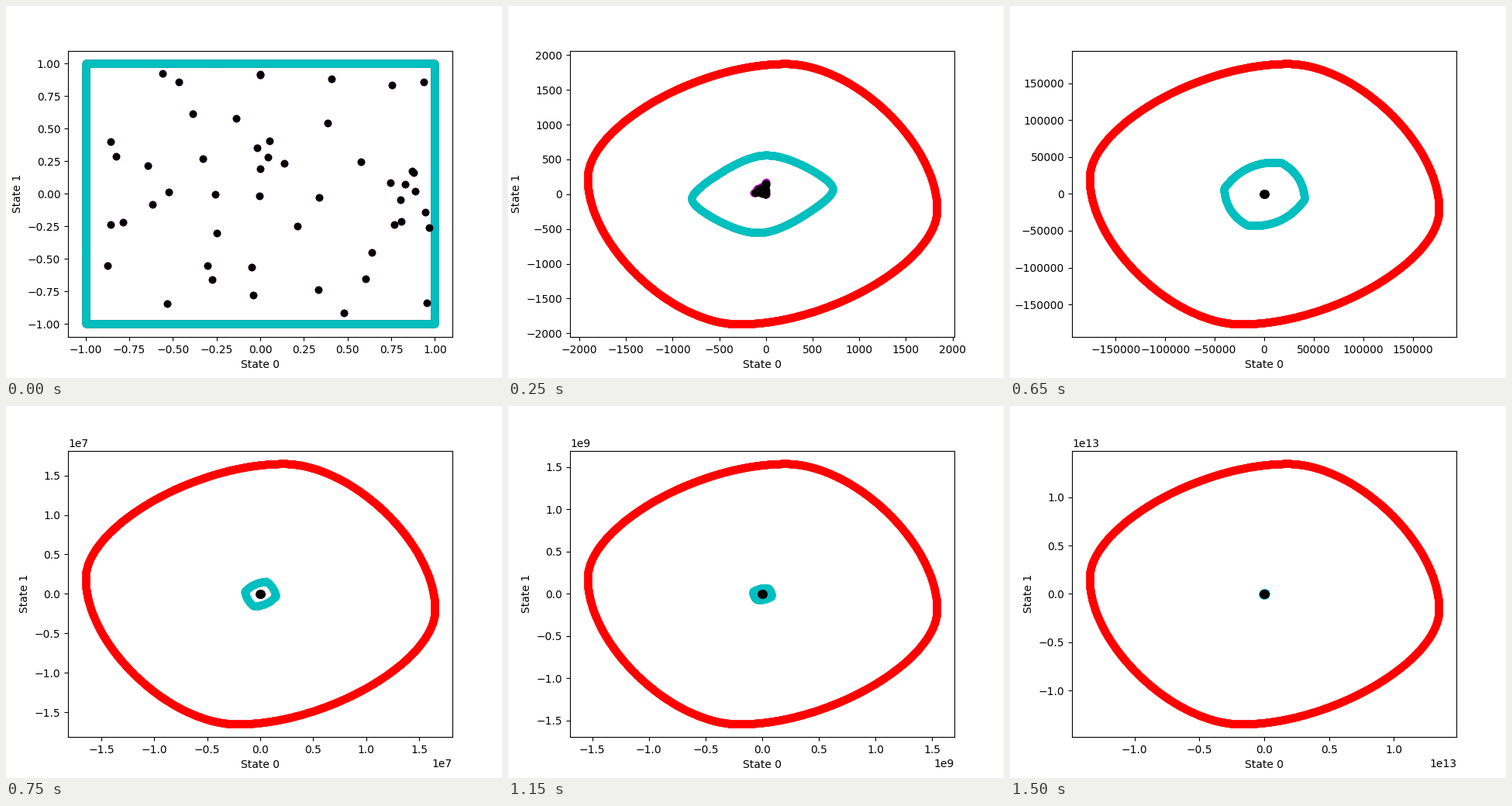
Animation of 640 by 480 pixels, one loop 1.75 s. Source, as a matplotlib script:

```python
import numpy as np
import matplotlib.pyplot as plt
from matplotlib.animation import FuncAnimation
from matplotlib.transforms import IdentityTransform

W, H = 640, 480
CENTER = np.array([328, H - 242.4])
HALF = np.array([225.45, 168])   # half extent of the outermost set
LIMIT, GROWTH = 1.942e5, 93.45   # axis range at step 2 and its growth per step
KAPPA = 0.45                     # fullness of the outer curve


def curve(*ctrl):
    """Quadratic or cubic Bezier through its control points."""
    t = np.linspace(0, 1, 60, endpoint=False)[:, None]
    pts = [np.array(p, float) for p in ctrl]
    while len(pts) > 1:
        pts = [a + (b - a) * t for a, b in zip(pts, pts[1:])]
    return pts[0]


def closed(half, step=0.5):
    """Point-reflect half an outline and dot it evenly around the centre."""
    p = np.vstack([half, -half, half[:1]])
    s = np.r_[0, np.cumsum(np.hypot(*np.diff(p, axis=0).T))]
    t = np.linspace(0, s[-1], int(s[-1] / step) + 4, endpoint=False)
    return CENTER + np.column_stack([np.interp(t, s, xy) for xy in p.T])


def rounded(half):
    """Quadratic spline that touches the middle of each polygon edge."""
    p = np.vstack([half, -np.array(half)])
    n = len(half)
    mid = (p + np.roll(p, 1, axis=0)) / 2
    return closed(np.vstack([curve(mid[k], p[k], mid[k + 1])
                             for k in range(n)]))


def bowed(a, b, bow):
    """Parallelogram a, b, -a, -b whose sides bend outwards."""
    a, b = np.array(a, float), np.array(b, float)
    sides = []
    for p, q in ((a, b), (b, -a)):
        dx, dy = q - p
        sides.append(curve(p, (p + q) / 2 + 2 * bow * np.array([-dy, dx]), q))
    return closed(np.vstack(sides))


hx, hy = HALF
left, top, right = np.array([(-hx, 20), (30, hy), (hx, -20)])
up, across = np.array([0, 1]), np.array([1, 0])
square = closed(np.array([(-hx, -hy), (-hx, hy)]))
bound = closed(np.vstack([
    curve(left, left + KAPPA * (top - left) * up,
          top + KAPPA * (left - top) * across, top),
    curve(top, top + KAPPA * (right - top) * across,
          right + KAPPA * (top - right) * up, right),
]))

inner = [
    square,
    rounded([(-91, 4), (-18, 50), (28, 50), (91, 16)]),
    bowed((-52, 7), (21.5, 40.5), 0.14),
    bowed((-20, 3), (8, 16), 0.1),
    bowed((-12, 3), (8, 7), 0.1),
    bowed((-5, 1), (3.5, 4), 0.1),
    bowed((-2, 0.5), (1, 1.8), 0.1),
]

rng = np.random.default_rng(4)
unit = rng.uniform(-1, 1, (50, 2))
samples = CENTER + unit * HALF

# after one step the samples fold into a small wedge with two arms
corner = CENTER + (5, -0.5)
wedge = rng.dirichlet((0.6, 0.6, 0.8), 50)[:, :2] @ [(-15, 2), (0, 14)]


def dots(i):
    """Exact samples and their slightly wider prediction."""
    if i == 0:
        return samples, samples
    if i == 1:
        return corner + wedge, corner + 1.15 * wedge
    return CENTER + 0.8 * unit, CENTER + 0.8 * unit


def limits(i):
    if i == 0:
        return (-1.1, 1.1), (-1.1, 1.1)
    if i == 1:
        return (-2100, 2020), (-2055, 2065)
    r = LIMIT * GROWTH ** (i - 2)
    return (-r, r), (-r, r)


fig, ax = plt.subplots(figsize=(W / 100, H / 100), dpi=100)
ax.set(xlabel="State 0", ylabel="State 1")
red, cyan, magenta, black = (
    ax.scatter([0], [0], color=c, transform=IdentityTransform())
    for c in "rcmk")


def draw(i):
    xlim, ylim = limits(i)
    ax.set(xlim=xlim, ylim=ylim)
    exact, predicted = dots(i)
    red.set_offsets(bound if i else square)
    cyan.set_offsets(inner[i])
    magenta.set_offsets(predicted)
    black.set_offsets(exact)
    return red, cyan, magenta, black


anim = FuncAnimation(fig, draw, frames=7, interval=250, repeat=True,
                     repeat_delay=0, blit=False)
plt.show()
```
